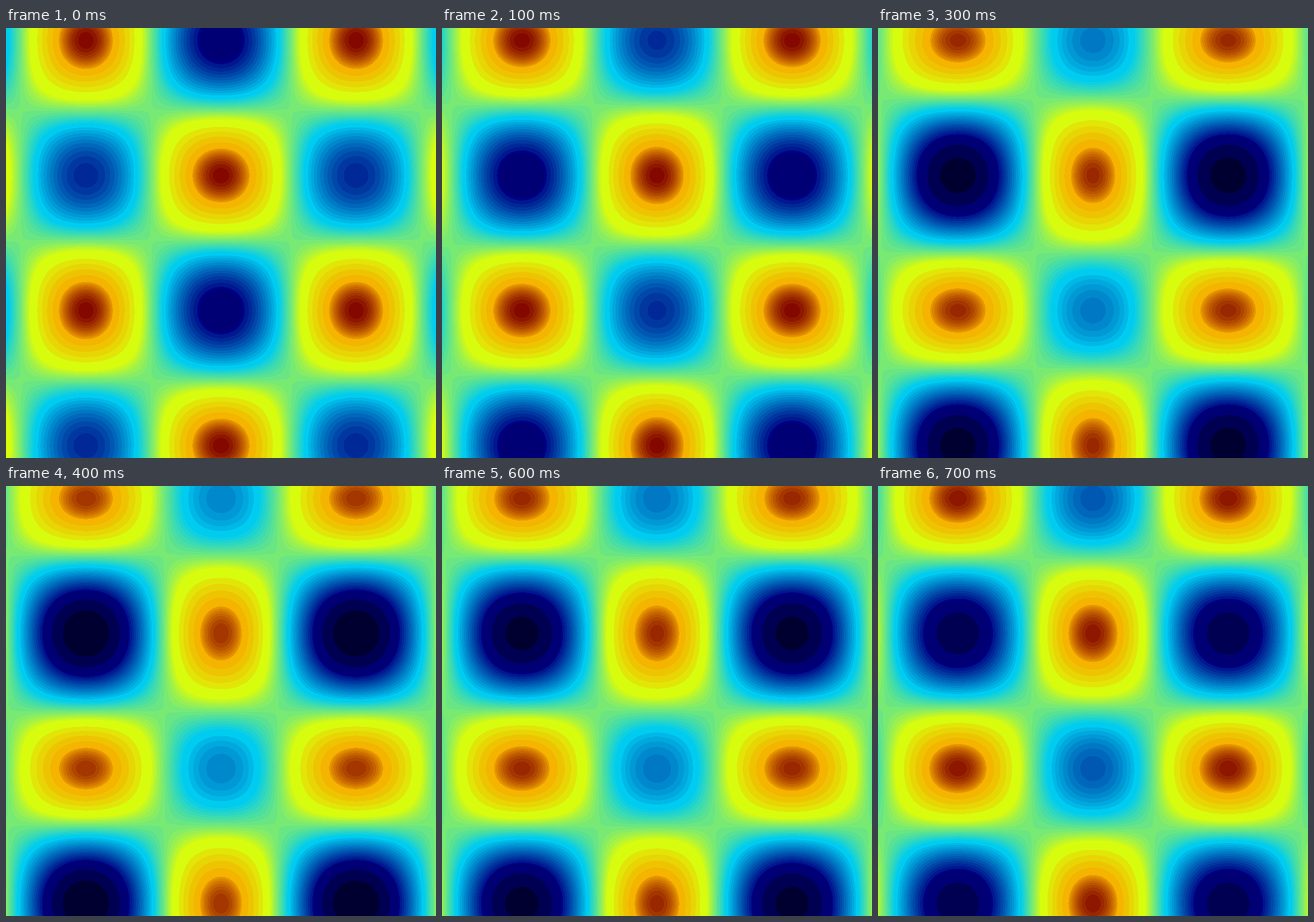
These frames come from a looping animation (748 by 748 pixels, 800 ms). A matplotlib script:

```python
import numpy as np
import matplotlib.pyplot as plt
from matplotlib.animation import FuncAnimation
from matplotlib.colors import BoundaryNorm, ListedColormap

SIZE = 748
DPI = 100
STEPS = 8
PERIOD = 470
CENTER_X, CENTER_Y = 374, 491.5
TOP = 1.0

# Contour colours: lower edge, number of even bands, first and last colour.
RAMPS = [
    (-1.575, 3, (0, 0, 48), (0, 0, 116)),
    (-0.99, 1, (0, 0, 132), (0, 0, 132)),
    (-0.96, 11, (0, 24, 143), (0, 184, 231)),
    (-0.36, 1, (0, 204, 240), (0, 204, 240)),
    (-0.27, 8, (15, 208, 224), (120, 234, 116)),
    (0.035, 5, (136, 237, 99), (200, 249, 31)),
    (0.214, 1, (216, 252, 14), (216, 252, 14)),
    (0.39, 4, (226, 230, 8), (244, 180, 0)),
    (0.797, 10, (230, 148, 0), (132, 8, 0)),
]


def build_palette():
    edges, colors = [], []
    uppers = [ramp[0] for ramp in RAMPS[1:]] + [TOP]
    for (lower, count, first, last), upper in zip(RAMPS, uppers):
        edges.extend(np.linspace(lower, upper, count, endpoint=False))
        colors.extend(np.linspace(first, last, count) / 255)
    cmap = ListedColormap(colors)
    return cmap, BoundaryNorm(edges + [TOP], cmap.N)


def wave(center):
    pixels = np.arange(SIZE) + 0.5
    return np.cos(2 * np.pi * (pixels - center) / PERIOD)


def field(step):
    # The bias rises and falls along a parabola, then jumps back.
    bias = 0.25 - 0.0155 * (step - 4.45) ** 2
    return -np.outer(wave(CENTER_Y) - bias, wave(CENTER_X) - bias)


fig = plt.figure(figsize=(SIZE / DPI, SIZE / DPI), dpi=DPI)
ax = fig.add_axes([0, 0, 1, 1])
ax.axis("off")
cmap, norm = build_palette()
image = ax.imshow(field(0), cmap=cmap, norm=norm,
                  interpolation="nearest", aspect="auto")


def update(step):
    image.set_data(field(step))
    return [image]


anim = FuncAnimation(fig, update, frames=STEPS, interval=100,
                     repeat=True, repeat_delay=0)
plt.show()
```
